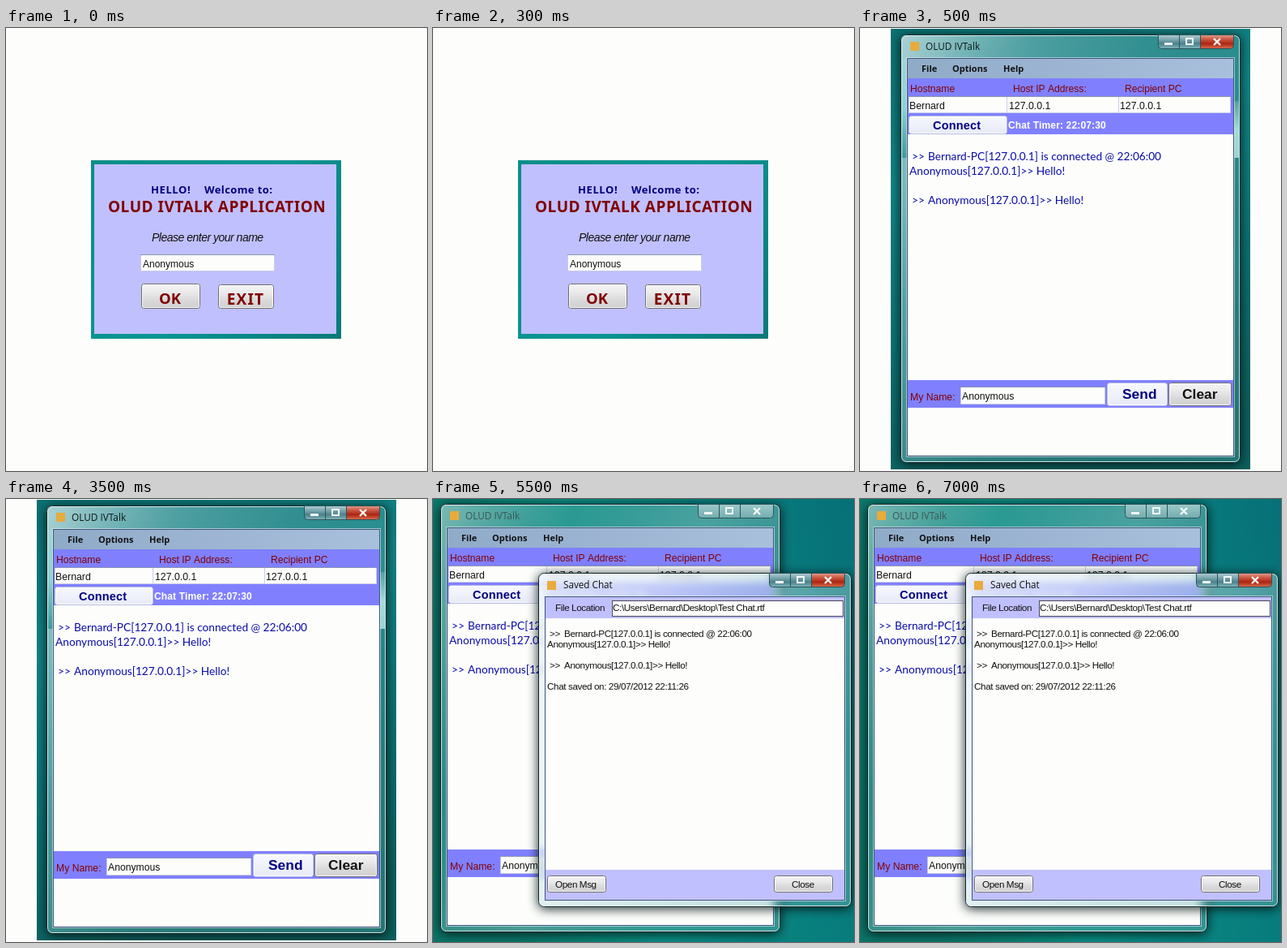
Animation of 520x546 px, one loop 8 s. Source, as an HTML page with a canvas:

```html
<!DOCTYPE html>
<html lang="en">
<head>
<meta charset="utf-8">
<title>Chat demo</title>
<style>
  html, body { margin: 0; width: 100%; height: 100%; overflow: hidden; background: #fdfefc; }
  canvas { display: block; }
</style>
</head>
<body>
<canvas id="stage" width="520" height="546"></canvas>
<script>
const stage = document.getElementById('stage');
const ctx = stage.getContext('2d');
const W = 520, H = 546, LOOP = 8000;

const SANS = '"Liberation Sans", Arial, sans-serif';
const UI = '"Open Sans", sans-serif';
const CHAT = 'Lato, sans-serif';
const ROUND = '"Noto Sans", sans-serif';

const PAPER = '#fdfefc', VIOLET = '#8080ff', LILAC = '#c0c0ff';
const MAROON = '#800000', NAVY = '#000080', INK = '#111', CHAT_BLUE = '#0a0aa8';

const APP = 'OLUD IVTalk', USER = 'Bernard', IP = '127.0.0.1';
const LOG = [
  ['>>', `${USER}-PC[${IP}] is connected @ 22:06:00`],
  [`Anonymous[${IP}]>> Hello!`],
  [],
  ['>>', `Anonymous[${IP}]>> Hello!`]
];

function rect(x, y, w, h, fill) {
  ctx.fillStyle = fill;
  ctx.fillRect(x, y, w, h);
}

function grad(x0, y0, x1, y1, ...colors) {
  const g = ctx.createLinearGradient(x0, y0, x1, y1);
  colors.forEach((c, i) => g.addColorStop(i / (colors.length - 1), c));
  return g;
}

function round(x, y, w, h, r, fill, stroke) {
  ctx.beginPath();
  ctx.roundRect(x + 0.5, y + 0.5, w - 1, h - 1, r);
  if (fill) { ctx.fillStyle = fill; ctx.fill(); }
  if (stroke) { ctx.strokeStyle = stroke; ctx.lineWidth = 1; ctx.stroke(); }
}

function text(str, x, y, font, color, gap = 0, align = 'left') {
  ctx.font = font;
  ctx.fillStyle = color;
  ctx.textAlign = align;
  ctx.letterSpacing = gap + 'px';
  ctx.fillText(str, x, y);
}

function field(x, y, w, h) {
  rect(x, y, w, h, '#c9cde6');
  rect(x, y, w, 1, '#8d93b4');
  rect(x + 1, y + 1, w - 2, h - 2, PAPER);
}

function button(x, y, w, h, bright) {
  const fill = bright
    ? grad(0, y, 0, y + h, '#f8f9ff', '#eff1fb', '#e6e9f5')
    : grad(0, y, 0, y + h, '#f5f5f5', '#ebebeb', '#d9d9d9', '#cfcfcf');
  round(x, y, w, h, 3, fill, bright ? '#b4bbe0' : '#707070');
  round(x + 1, y + 1, w - 2, h - 2, 2, null, 'rgba(255,255,255,.8)');
}

// Minimise, maximise and close, hanging from the top edge.
function captionButtons(x, y, active) {
  const wide = 42;
  const glass = active
    ? grad(0, y, 0, y + 17, '#b5d0d6', '#7faab2', '#4a828b', '#7fb2b8')
    : grad(0, y, 0, y + 17, '#9dcaca', '#74adaf');
  const red = active ? grad(0, y, 0, y + 17, '#e4a496', '#cb5a45', '#ad2411', '#d5694b') : glass;
  ctx.beginPath();
  ctx.roundRect(x + 0.5, y + 0.5, 51 + wide, 17, [0, 0, 4, 4]);
  ctx.fillStyle = glass;
  ctx.fill();
  ctx.save();
  ctx.clip();
  rect(x + 52, y, wide, 18, red);
  ctx.restore();
  ctx.strokeStyle = '#2c5359';
  ctx.lineWidth = 1;
  ctx.stroke();
  rect(x + 26, y, 1, 17, '#2c5359');
  rect(x + 52, y, 1, 17, '#2c5359');
  rect(x + 8, y + 10, 10, 3, '#f4f8f8');
  ctx.strokeStyle = '#f4f8f8';
  ctx.lineWidth = 2;
  ctx.strokeRect(x + 35, y + 5, 8, 7);
  const cx = x + 52 + wide / 2, cy = y + 9;
  ctx.beginPath();
  ctx.moveTo(cx - 4, cy - 4); ctx.lineTo(cx + 4, cy + 4);
  ctx.moveTo(cx + 4, cy - 4); ctx.lineTo(cx - 4, cy + 4);
  ctx.lineWidth = 2.4;
  ctx.stroke();
}

// Glass window border: blurred backdrop under a tint, with a shadow outside.
function frame(x, y, w, h, tint) {
  const shape = new Path2D();
  shape.roundRect(x, y, w, h, 7);
  const outside = new Path2D(shape);
  outside.rect(-W, -H, 3 * W, 3 * H);

  ctx.save();
  ctx.clip(shape);
  ctx.save();
  ctx.resetTransform();
  ctx.filter = 'blur(5px)';
  ctx.drawImage(stage, 0, 0);
  ctx.restore();
  rect(x, y, w, h, tint);
  ctx.restore();

  ctx.save();
  ctx.clip(outside, 'evenodd');
  ctx.shadowColor = 'rgba(0,15,15,.9)';
  ctx.shadowBlur = 14;
  ctx.shadowOffsetY = 2;
  ctx.fillStyle = '#000';
  ctx.fill(shape);
  ctx.restore();

  round(x, y, w, h, 7, null, '#12292c');
  round(x + 1, y + 1, w - 2, h - 2, 6, null, 'rgba(235,250,250,.8)');
}

function client(x, y, w, h, fill) {
  rect(x - 2, y - 2, w + 4, h + 4, 'rgba(225,240,245,.6)');
  rect(x - 1, y - 1, w + 2, h + 2, '#40567c');
  rect(x, y, w, h, fill);
}

function chatLog(x, y, indent, step, font, color, gap) {
  LOG.forEach((parts, i) => {
    const row = y + i * step;
    if (parts.length === 2) {
      text(parts[0], x + 3, row, font, color, gap);
      text(parts[1], x + indent, row, font, color, gap);
    } else if (parts.length) {
      text(parts[0], x, row, font, color, gap);
    }
  });
}

function welcome() {
  rect(0, 0, W, H, '#fdfefc');
  rect(105, 163, 309, 220, grad(105, 163, 414, 383, '#0a8d89', '#0a9692', '#087a78'));
  rect(109, 168, 299, 209, LILAC);

  const hello = `bold 13px ${ROUND}`;
  text('HELLO!', 179, 204, hello, NAVY, 0.6);
  text('Welcome to:', 245, 204, hello, NAVY, 0.4);
  text(`${APP.toUpperCase()} APPLICATION`, 126, 227, `bold 19px ${ROUND}`, MAROON, 0.5);
  text('Please enter your name', 180, 263, `italic 14px ${SANS}`, INK, -0.5);

  field(166, 279, 166, 21);
  text('Anonymous', 169, 295, `12px ${SANS}`, INK);
  button(167, 315, 73, 31);
  button(262, 316, 69, 30);
  text('OK', 202.5, 340, `bold 18.5px ${ROUND}`, MAROON, 0, 'center');
  text('EXIT', 296, 341, `bold 19px ${ROUND}`, MAROON, 1.2, 'center');
}

function mainWindow(dx, dy, active) {
  ctx.save();
  ctx.translate(dx, dy);
  frame(50, 8, 420, 528, active
    ? grad(50, 8, 470, 200, 'rgba(200,228,232,.85)', 'rgba(120,185,188,.6)', 'rgba(90,165,168,.4)', 'rgba(80,160,162,.35)')
    : grad(50, 8, 470, 200, 'rgba(170,212,210,.7)', 'rgba(90,170,168,.4)', 'rgba(140,195,194,.5)', 'rgba(110,175,174,.4)'));
  if (active) {
    rect(52, 38, 6, 122, grad(0, 38, 0, 160, '#a3d4d8', '#8fd0d2', '#3b9a9b'));
    rect(462, 90, 6, 70, grad(0, 90, 0, 160, '#4f9fa1', '#a5dadb', '#9ad2d4'));
  }
  rect(62, 17, 11, 11, '#e8ab3c');
  text(APP, 81, 27, `11.8px ${UI}`, active ? '#101818' : '#3c5656');
  captionButtons(368, 8, active);

  client(59, 38, 402, 489, PAPER);
  rect(59, 38, 402, 24, grad(59, 0, 461, 0, '#8fabc8', '#9db5d2', '#a9c0dc'));
  const menu = `bold 11px ${UI}`;
  text('File', 76, 54, menu, INK);
  text('Options', 114, 54, menu, INK);
  text('Help', 177, 54, menu, INK);

  rect(59, 62, 402, 69, VIOLET);
  const label = `12.1px ${SANS}`, value = `12.3px ${SANS}`;
  text('Hostname', 62, 79, label, MAROON);
  text('Host IP Address:', 189, 79, label, MAROON);
  text('Recipient PC', 327, 79, label, MAROON);
  field(60, 84, 122, 21);
  field(181, 84, 139, 21);
  field(319, 84, 139, 21);
  text(USER, 61, 100, value, INK);
  text(IP, 184, 100, value, INK);
  text(IP, 321, 100, value, INK);

  button(60, 108, 122, 23, true);
  text('Connect', 90, 125, `bold 14.5px ${SANS}`, NAVY, 0.2);
  text('Chat Timer: 22:07:30', 183, 124, `bold 12px ${SANS}`, '#fff', 0.15);

  chatLog(61, 163, 23, 18, `13.7px ${CHAT}`, CHAT_BLUE, 0);

  rect(59, 434, 402, 34, VIOLET);
  text('My Name:', 62, 459, `12.2px ${SANS}`, MAROON);
  field(124, 442, 179, 22);
  text('Anonymous', 126, 458, `12.2px ${SANS}`, INK);
  button(305, 437, 75, 29, true);
  button(381, 437, 78, 29);
  const big = `bold 17.4px ${SANS}`;
  text('Send', 324, 457, big, NAVY);
  text('Clear', 398, 457, big, INK);
  ctx.restore();
}

function savedChat() {
  frame(130, 91, 387, 412, grad(130, 91, 517, 300,
    'rgba(240,245,252,.8)', 'rgba(225,238,245,.65)', 'rgba(170,212,214,.5)', 'rgba(120,180,182,.4)'));
  rect(141, 101, 11, 11, '#e8ab3c');
  text('Saved Chat', 161, 110, `11.7px ${UI}`, INK);
  captionButtons(415, 91, true);

  client(139, 121, 369, 373, LILAC);
  rect(139, 147, 369, 310, PAPER);
  rect(221, 125, 286, 20, '#4a4a5c');
  rect(222, 126, 284, 18, PAPER);

  const font = `11.7px ${SANS}`, gap = -0.4;
  text('File Location', 151, 138, font, INK, gap);
  text(`C:\\Users\\${USER}\\Desktop\\Test Chat.rtf`, 222, 138, font, INK, gap);
  chatLog(141, 170, 21, 13, font, INK, gap);
  text('Chat saved on: 29/07/2012 22:11:26', 141, 235, font, INK, gap);

  button(141, 464, 73, 21);
  button(421, 464, 73, 21);
  text('Open Msg', 151, 479, font, INK, gap);
  text('Close', 443, 479, font, INK, gap);
}

function chatting() {
  rect(0, 0, W, H, PAPER);
  ctx.save();
  ctx.beginPath();
  ctx.rect(38, 1, 444, 543);
  ctx.clip();
  rect(38, 1, 444, 543, grad(38, 1, 200, 544, '#0b6f70', '#128586', '#0c7273', '#0d5f5d'));
  mainWindow(0, 0, true);
  ctx.restore();
}

function saved() {
  rect(0, 0, W, H, grad(0, 120, W, 0, '#0b7468', '#0a8f84', '#08807e', '#077078'));
  mainWindow(-41, -2, false);
  savedChat();
}

function sceneAt(t) {
  if (t < 500) return welcome;
  return t < 5500 ? chatting : saved;
}

const start = performance.now();
let shown = null;
function tick() {
  const scene = sceneAt((performance.now() - start) % LOOP);
  if (scene !== shown) {
    scene();
    shown = scene;
  }
  requestAnimationFrame(tick);
}
tick();
</script>
</body>
</html>
```
